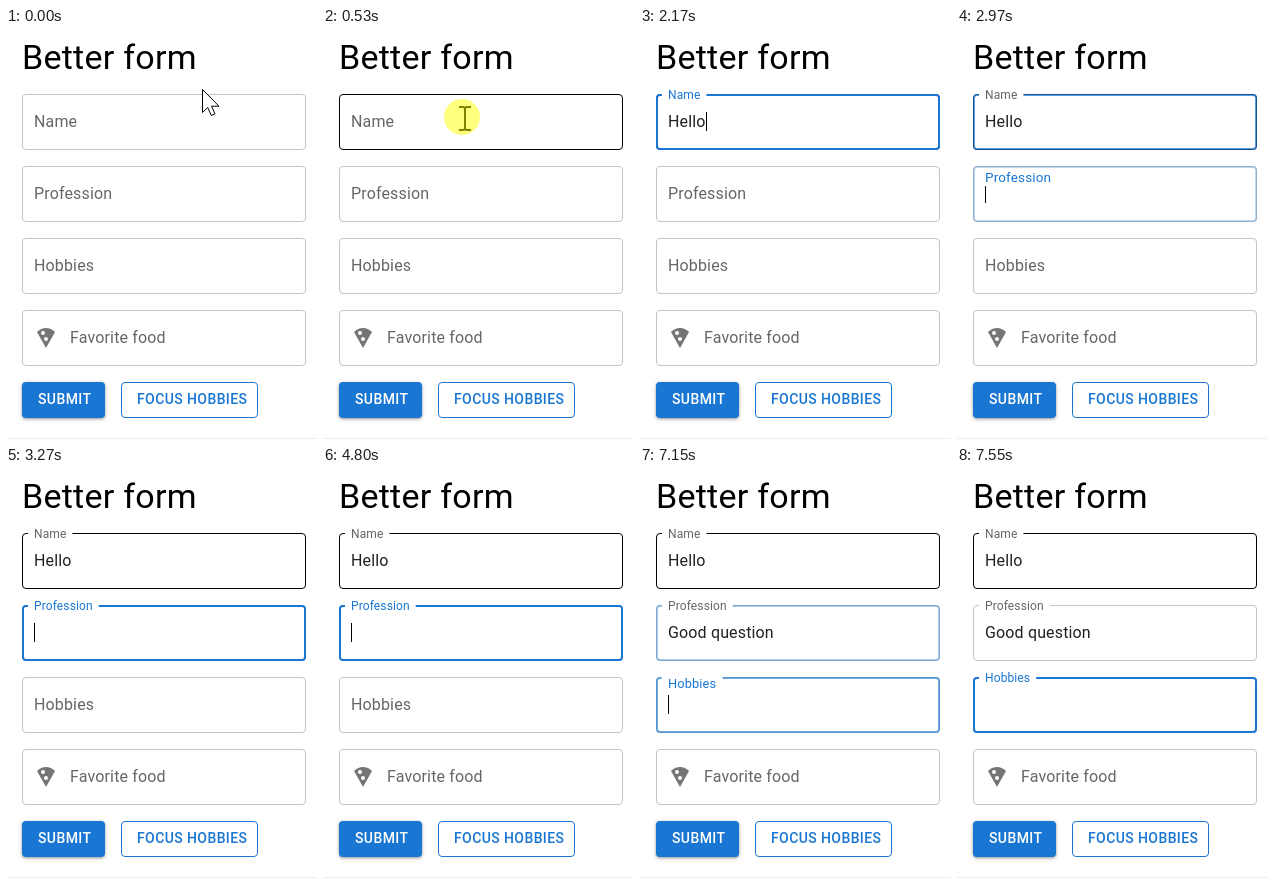
An HTML page for the animation above (8000 ms loop, 311 by 411 pixels).

```html
<!DOCTYPE html>
<html lang="en">
<head>
<meta charset="utf-8">
<title>Better form</title>
<style>
  html, body { margin: 0; width: 100%; height: 100%; overflow: hidden; background: #fff; }
  svg { display: block; width: 100vw; height: 100vh; }
  text { font: 400 16px Roboto, sans-serif; letter-spacing: .15px; white-space: pre; }
  .title { font-size: 34px; letter-spacing: .25px; }
  .button { font-size: 14px; font-weight: 500; letter-spacing: .4px; }
  .raised { filter: drop-shadow(0 1px 1px rgba(0,0,0,.25)) drop-shadow(0 1px 2px rgba(0,0,0,.2)); }
</style>
</head>
<body>
<svg id="stage" viewBox="0 0 311 411">
  <rect width="311" height="411" fill="#fff"/>
  <rect y="410" width="311" height="1" fill="#eee"/>
  <text class="title" x="16" y="41">Better form</text>
  <g id="fields"></g>
  <path transform="translate(28 298)" fill="#757575" fill-rule="evenodd"
    d="M3 6Q7 2 12 2T21 6L12 22ZM7 7a2 2 0 0 0 4 0a2 2 0 0 0-4 0ZM10 13a2 2 0 0 0 4 0a2 2 0 0 0-4 0Z"/>
  <rect class="raised" x="16" y="354" width="83" height="36" rx="4" fill="#1976d2"/>
  <text class="button" x="32" y="376" fill="#fff">SUBMIT</text>
  <rect x="115.5" y="354.5" width="136" height="35" rx="3.5" fill="none" stroke="#1976d2"/>
  <text class="button" x="131" y="376" fill="#1976d2">FOCUS HOBBIES</text>
  <path id="arrow" d="M.5 .5V23.5L5.7 18.5L9.3 26.5L13 24.9L9.5 17.2H17Z" fill="#fff" stroke="#000"/>
  <path id="beam" fill="none" stroke="#000" stroke-width="2"
    d="M-6-11.5h4q2 0 2 2v19q0 2-2 2h-4M6-11.5h-4q-2 0-2 2v19q0 2 2 2h4"/>
  <circle id="press" cx="139" cy="89" r="18" fill="#ff0"/>
</svg>
<script>
const LOOP = 8000, BLUE = '#1976d2', GREY = '#666';
const $ = id => document.getElementById(id);

function make(tag, attrs, parent) {
  const el = document.createElementNS('http://www.w3.org/2000/svg', tag);
  set(el, attrs);
  parent.appendChild(el);
  return el;
}
function set(el, attrs) {
  for (const key in attrs) el.setAttribute(key, attrs[key]);
}

const clamp = v => Math.max(0, Math.min(1, v));
const within = (t, spans) => spans.some(([from, to]) => t >= from && t < to);

function bezier(x1, y1, x2, y2) {
  const at = (a, b, s) => 3 * a * s * (1 - s) ** 2 + 3 * b * s * s * (1 - s) + s ** 3;
  return x => {
    let lo = 0, hi = 1;
    for (let i = 0; i < 24; i++) {
      const mid = (lo + hi) / 2;
      if (at(x1, x2, mid) < x) lo = mid; else hi = mid;
    }
    return at(y1, y2, lo);
  };
}
const swift = bezier(.25, .8, .25, 1);
const standard = bezier(.4, 0, .2, 1);
const ramp = (t, start, length, ease) => ease(clamp((t - start) / length));

// Each key is [time, value after the key press]
const typed = (word, times) => times.map((t, i) => [t, word.slice(0, i + 1)]);

const caretOn = [[590, 1100], [1580, 2680], [2890, 3960], [4490, 5010], [5320, 6060], [6210, 7550]];

const fields = [
  { name: 'Name', y: 66, focus: 590, blur: 2890,
    keys: typed('Hello', [1580, 1700, 1850, 2000, 2170]) },
  { name: 'Profession', y: 138, focus: 2890, blur: 7030,
    keys: [[3430, 'H'], [4800, ''], ...typed('Good question',
      [5320, 5490, 5590, 5690, 5900, 6210, 6310, 6410, 6520, 6620, 6700, 6780, 6860])] },
  { name: 'Hobbies', y: 210, focus: 7030, blur: LOOP, keys: [] },
  { name: 'Favorite food', y: 282, x: 64, focus: LOOP, blur: LOOP, keys: [] }
];

for (const f of fields) {
  const g = make('g', {}, $('fields'));
  f.x = f.x || 28;
  f.line = make('rect', { x: 16.5, y: f.y + .5, width: 283, height: 55, rx: 3.5, fill: 'none' }, g);
  f.ring = make('rect', { x: 17, y: f.y + 1, width: 282, height: 54, rx: 3, fill: 'none',
    stroke: BLUE, 'stroke-width': 2 }, g);
  f.value = make('text', { x: f.x, y: f.y + 33, fill: '#212121' }, g);
  f.caret = make('rect', { y: f.y + 18, width: 1, height: 19, fill: '#000' }, g);
  f.label = make('g', {}, g);
  f.back = make('rect', { x: -8, y: -15, height: 20, fill: '#fff' }, f.label);
  f.text = make('text', {}, f.label);
  f.text.textContent = f.name;
}

function drawField(f, t, hover) {
  const active = t >= f.focus && t < f.blur;
  const float = ramp(t, f.focus, 400, swift);
  const ring = ramp(t, f.focus, 300, standard) - ramp(t, f.blur, 300, standard);
  const last = f.keys.filter(k => k[0] <= t).pop();

  set(f.line, { stroke: hover ? '#000' : '#c4c4c4' });
  set(f.ring, { opacity: ring });
  set(f.label, { transform: `translate(${f.x} ${f.y + 33 - 28 * float}) scale(${1 - float / 4})` });
  set(f.back, { width: f.text.getComputedTextLength() + 16 });
  set(f.text, { fill: active ? BLUE : GREY });

  f.value.textContent = last ? last[1] : '';
  const end = last && last[1] ? f.value.getComputedTextLength() : 0;
  set(f.caret, { x: Math.round(f.x + end), opacity: active && within(t, caretOn) ? 1 : 0 });
}

function draw(t) {
  const move = ramp(t, 100, 380, standard);
  const x = 196 - 54 * move, y = 61 + 29.5 * move;
  const hover = y >= 66;
  const shown = t < 1580 || within(t, [[4330, 4800]]);

  fields.forEach((f, i) => drawField(f, t, i === 0 && hover));
  set($('arrow'), { transform: `translate(${x} ${y})`, opacity: hover ? 0 : 1 });
  set($('beam'), { transform: `translate(${x} ${y})`, opacity: hover && shown ? 1 : 0 });
  set($('press'), { opacity: t < 490 ? 0 : .5 * (1 - clamp((t - 640) / 160)) });
}

const start = performance.now();
function tick() {
  draw((performance.now() - start) % LOOP);
  requestAnimationFrame(tick);
}
tick();
</script>
</body>
</html>
```
